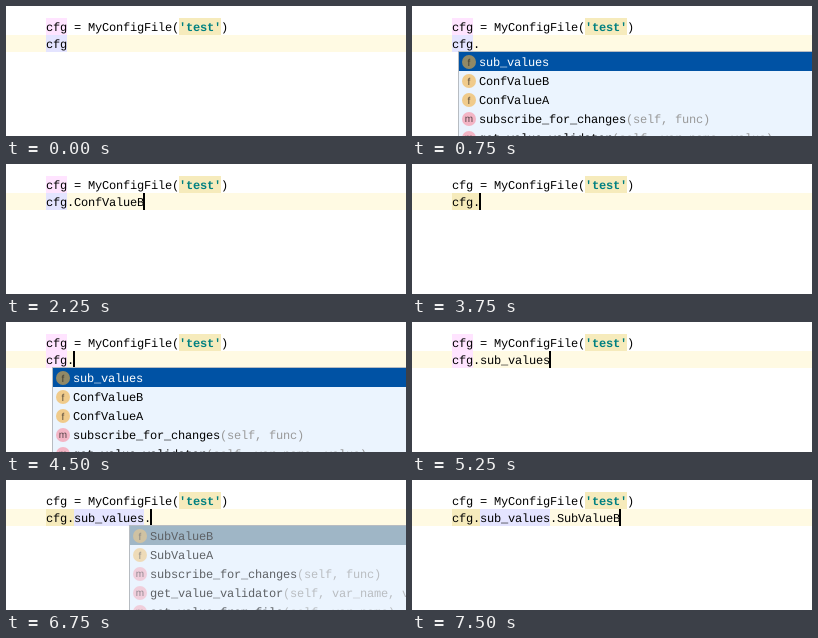
Recreate the animation shown at these times as an HTML page. Size 400x130 px, loop 9500 ms.

```html
<!DOCTYPE html>
<html lang="en">
<head>
<meta charset="utf-8">
<title>Code completion</title>
<style>
html, body { margin: 0; width: 100%; height: 100%; overflow: hidden; background: #fff; }
svg { display: block; width: 400px; height: 130px; }
text {
  font: 12px "Liberation Mono", "Courier New", monospace;
  letter-spacing: -.2px;
  text-rendering: geometricPrecision;
  white-space: pre;
}
.str { font-weight: bold; fill: #008080; }
.write { fill: #ffe4ff; }
.read { fill: #e4e4ff; }
.warn { fill: #f6ebbc; }
.args { fill: #999; }
.panel { fill: #ebf4fe; stroke: #b7bcc2; }
.icon text { font: 10px "Liberation Sans", Arial, sans-serif; letter-spacing: 0; text-anchor: middle; fill: #231f20; fill-opacity: .75; }
.field { fill: #f4af3d; fill-opacity: .6; }
.method { fill: #f98b9e; fill-opacity: .6; }
.faded { opacity: .6; }

/* One 9.5 s loop of hard cuts; each step is 750 ms = 7.8947% */
.anim { animation: 9.5s step-end infinite; }
.usage { animation-name: usage; }
.tint { animation-name: tint; }
.stale { animation-name: stale; }
.resolved { animation-name: resolved; }
.dot { animation-name: dot; }
.conf { animation-name: conf; }
.sub { animation-name: sub; }
.tail { animation-name: tail; }
.last { animation-name: last; }
.caret { animation-name: caret; }
.list-a { animation-name: list-a; }
.list-b { animation-name: list-b; }
.bar { animation-name: bar; }
.row-1 { animation-name: row-1; }
.row-2 { animation-name: row-2; }

@keyframes usage {
  0%, 47.3684% { opacity: 1; }
  39.4737%, 63.1579%, 100% { opacity: 0; }
}
@keyframes tint { 0% { fill: #e4e4ff; } 39.4737%, 100% { fill: #ffe4ff; } }
@keyframes stale {
  0%, 47.3684% { opacity: 0; }
  39.4737%, 63.1579%, 100% { opacity: 1; }
}
@keyframes resolved { 0% { opacity: 0; } 63.1579%, 100% { opacity: 1; } }
@keyframes dot { 0% { opacity: 0; } 7.8947%, 100% { opacity: 1; } }
@keyframes conf { 0%, 39.4737%, 100% { opacity: 0; } 23.6842% { opacity: 1; } }
@keyframes sub { 0% { opacity: 0; } 55.2632%, 100% { opacity: 1; } }
@keyframes tail { 0% { opacity: 0; } 71.0526%, 100% { opacity: 1; } }
@keyframes last { 0% { opacity: 0; } 78.9474%, 100% { opacity: 1; } }
@keyframes caret {
  0% { transform: translateX(-20px); }
  15.7895%, 39.4737% { transform: translateX(67px); }
  23.6842%, 55.2632% { transform: translateX(137px); }
  71.0526% { transform: translateX(144px); }
  78.9474%, 100% { transform: translateX(207px); }
}
@keyframes list-a {
  0%, 23.6842%, 55.2632%, 100% { opacity: 0; }
  7.8947%, 47.3684% { opacity: 1; }
}
@keyframes list-b { 0%, 78.9474%, 100% { opacity: 0; } 71.0526% { opacity: 1; } }
@keyframes bar {
  0%, 23.6842%, 100% { transform: translateY(0); }
  15.7895% { transform: translateY(19px); }
}
@keyframes row-1 { 0%, 23.6842%, 100% { fill: #fff; } 15.7895% { fill: #000; } }
@keyframes row-2 { 0%, 23.6842%, 100% { fill: #000; } 15.7895% { fill: #fff; } }
</style>
</head>
<body>
<svg viewBox="0 0 400 130">
  <defs>
    <g id="f" class="icon"><circle class="field" cx="11" cy="11" r="7"/><text x="11" y="14.5">f</text></g>
    <g id="m" class="icon"><circle class="method" cx="11" cy="11" r="7"/><text x="11" y="13.8">m</text></g>
  </defs>

  <rect y="29" width="400" height="17" fill="#fffae3"/>
  <rect class="warn" x="173" y="12" width="42" height="17"/>
  <g class="anim usage">
    <rect class="write" x="40" y="12" width="21" height="17"/>
    <rect class="anim tint" x="40" y="29" width="21" height="17"/>
  </g>
  <rect class="anim stale warn" x="40" y="29" width="28" height="17"/>
  <rect class="anim resolved read" x="68" y="29" width="70" height="17"/>

  <text x="40" y="25">cfg = MyConfigFile(<tspan class="str">'test'</tspan>)</text>
  <text x="40" y="42">cfg</text>
  <text class="anim dot" x="61" y="42">.</text>
  <text class="anim conf" x="68" y="42">ConfValueB</text>
  <text class="anim sub" x="68" y="42">sub_values</text>
  <text class="anim tail" x="138" y="42">.</text>
  <text class="anim last" x="145" y="42">SubValueB</text>
  <rect class="anim caret" y="29" width="2" height="17"/>

  <g transform="translate(46 45)">
    <g class="anim list-a">
      <rect class="panel" x=".5" y=".5" width="400" height="120"/>
      <rect class="anim bar" x="1" y="1" width="400" height="19" fill="#0052a4"/>
      <use href="#f"/><text class="anim row-1" x="21" y="15">sub_values</text>
      <use href="#f" y="19"/><text class="anim row-2" x="21" y="34">ConfValueB</text>
      <use href="#f" y="38"/><text x="21" y="53">ConfValueA</text>
      <use href="#m" y="57"/><text x="21" y="72">subscribe_for_changes<tspan class="args">(self, func)</tspan></text>
      <use href="#m" y="76"/><text x="21" y="91">get_value_validator<tspan class="args">(self, var_name, value)</tspan></text>
    </g>
  </g>

  <g transform="translate(123 45)">
    <g class="anim list-b">
      <rect class="panel" x=".5" y=".5" width="400" height="120"/>
      <g class="faded">
        <rect x="1" y="1" width="400" height="19" fill="#6e8ea2"/>
        <use href="#f"/><text x="21" y="15">SubValueB</text>
        <use href="#f" y="19"/><text x="21" y="34">SubValueA</text>
        <use href="#m" y="38"/><text x="21" y="53">subscribe_for_changes<tspan class="args">(self, func)</tspan></text>
        <use href="#m" y="57"/><text x="21" y="72">get_value_validator<tspan class="args">(self, var_name, value)</tspan></text>
        <use href="#m" y="76"/><text x="21" y="91">set_value_from_file<tspan class="args">(self, var_name)</tspan></text>
      </g>
    </g>
  </g>
</svg>
</body>
</html>
```
